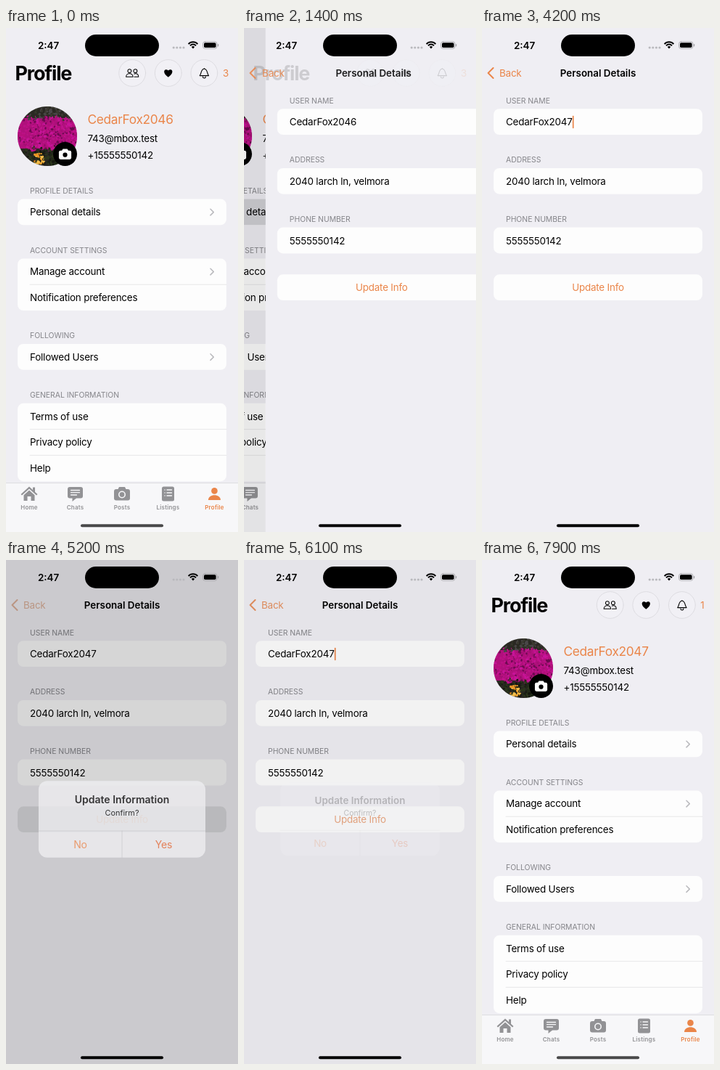
Animation of 320 by 694 pixels, one loop 8 s. Source, as an HTML page with a canvas:

```html
<!DOCTYPE html>
<html lang="en">
<head>
<meta charset="utf-8">
<title>Profile settings</title>
<style>
  html, body { margin: 0; width: 100%; height: 100%; overflow: hidden; background: #efeef3; }
  canvas { display: block; width: 320px; height: 694px; }
</style>
</head>
<body>
<canvas id="stage"></canvas>
<script>
const W = 320, H = 694, LOOP = 8000;
const BG = '#efeef3', CARD = '#fdfdfd', ORANGE = '#ea8549', GRAY = '#929295', PRESSED = '#d1d1d6';
const canvas = document.getElementById('stage');
const ctx = canvas.getContext('2d');
const dpr = window.devicePixelRatio || 1;
canvas.width = W * dpr;
canvas.height = H * dpr;

// Critically damped spring from 0 to 1
const spring = (t, start, speed) => {
  const u = Math.max(0, t - start) * speed / 1000;
  return 1 - (1 + u) * Math.exp(-u);
};
const ramp = (t, a, b) => Math.min(1, Math.max(0, (t - a) / (b - a)));

function layer(x, y, alpha, draw, scale = 1) {
  if (alpha <= 0) return;
  ctx.save();
  ctx.translate(x, y);
  ctx.scale(scale, scale);
  ctx.globalAlpha *= Math.min(1, alpha);
  draw();
  ctx.restore();
}

// y is the middle of the capital letters
function text(s, x, y, { size = 13.4, color = '#000', weight = 400, align = 'left', spacing } = {}) {
  ctx.font = `${weight} ${size}px Inter, sans-serif`;
  ctx.letterSpacing = (spacing ?? (weight === 400 && size > 11 ? -0.014 * size : 0)) + 'px';
  ctx.textAlign = align;
  ctx.fillStyle = color;
  ctx.fillText(s, x, y + size * 0.36);
  return ctx.measureText(s).width;
}

function box(x, y, w, h, r, color) {
  ctx.fillStyle = color;
  ctx.beginPath();
  ctx.roundRect(x, y, w, h, r);
  ctx.fill();
}

function disc(x, y, r, color) {
  ctx.fillStyle = color;
  ctx.beginPath();
  ctx.arc(x, y, r, 0, 7);
  ctx.fill();
}

function fill(d, color) {
  ctx.fillStyle = color;
  ctx.fill(new Path2D(d));
}

function line(d, color, width) {
  ctx.strokeStyle = color;
  ctx.lineWidth = width;
  ctx.lineCap = ctx.lineJoin = 'round';
  ctx.stroke(new Path2D(d));
}

const header = (s, y) => text(s, 33, y, { size: 10.4, color: '#85858a' });

function makeFlowers() {
  const c = document.createElement('canvas');
  c.width = c.height = 164;
  const g = c.getContext('2d');
  let seed = 11;
  const rnd = () => (seed = (seed * 16807) % 2147483647) / 2147483647;
  const pick = list => list[Math.floor(rnd() * list.length)];
  const dab = (x, y, r, color) => {
    g.fillStyle = color;
    g.beginPath();
    g.ellipse(x, y, r, r * 0.7, rnd() * 3, 0, 7);
    g.fill();
  };
  g.scale(2, 2);
  g.beginPath();
  g.arc(41, 41, 41, 0, 7);
  g.clip();
  g.fillStyle = '#2a2823';
  g.fillRect(0, 0, 82, 82);
  g.fillStyle = '#b0107c';
  g.fillRect(0, 16, 82, 42);
  for (let i = 0; i < 1100; i++) {
    const x = rnd() * 82, y = rnd() * 82;
    const tones = y < 13 + rnd() * 6 ? ['#3b3a30', '#4a4748', '#2a2c22']
      : y < 54 + rnd() * 10 ? ['#b8107e', '#c8149a', '#c2128c', '#a50e74', '#bb1286', '#6d0a50']
      : ['#1f2a16', '#2c371c', '#15180f', '#1b1c16'];
    dab(x, y, 1 + rnd() * 1.3, pick(tones));
  }
  for (let i = 0; i < 26; i++)
    dab(22 + rnd() * 15, 65 + rnd() * 14, 1 + rnd() * 1.5, pick(['#f0a02c', '#e98a1c', '#f4bd4a']));
  return c;
}
const flowers = makeFlowers();

function camera(color, hole, lens) {
  box(-11, -6, 22, 15.5, 3, color);
  fill('M-6-5L-4-9H4L6-5z', color);
  disc(0, 1.5, lens, hole);
}

const tabs = [
  ['Home', 32, () => {
    fill('M-11.5 1L0-9.5L11.5 1L10 2.6L0-6.4L-10 2.6z M5-8.5H8V-2L5-5z', GRAY);
    fill('M-7.5 2.2L0-4.6L7.5 2.2V10H2.5V4H-2.5V10H-7.5z', GRAY);
  }],
  ['Chats', 95.5, () => {
    box(-10.5, -9, 21, 15.5, 3, GRAY);
    fill('M-4 6V11L2 6z', GRAY);
    line('M-6-4.5H6M-6-1.3H6M-6 2H2', '#f7f7f9', 1.3);
  }],
  ['Posts', 160, () => {
    camera(GRAY, '#f7f7f9', 5);
    disc(0, 1.5, 3.4, GRAY);
  }],
  ['Listings', 223.5, () => {
    box(-8.5, -9.5, 17, 20, 2.5, GRAY);
    line('M-4.5-5h.1M-1.5-5H5M-4.5-1h.1M-1.5-1H5M-4.5 3h.1M-1.5 3H5', '#f7f7f9', 1.4);
  }],
  ['Profile', 287.5, () => {
    disc(0, -3.6, 4.3, ORANGE);
    fill('M-8.5 9C-8.5 0 8.5 0 8.5 9z', ORANGE);
  }],
];

const sections = [
  ['PROFILE DETAILS', 235.5, ['Personal details'], true],
  ['ACCOUNT SETTINGS', 317.5, ['Manage account', 'Notification preferences'], true],
  ['FOLLOWING', 435, ['Followed Users'], true],
  ['GENERAL INFORMATION', 516.8, ['Terms of use', 'Privacy policy', 'Help'], false],
];

function profilePage(name, pressed) {
  ctx.fillStyle = BG;
  ctx.fillRect(0, 0, W + 100, H);
  ctx.drawImage(flowers, 16, 108, 82, 82);
  disc(81.5, 173.5, 16.5, '#000');
  layer(81.5, 173.5, 1, () => camera('#fff', '#000', 4), 0.78);
  text(name, 112.5, 126, { size: 17.3, color: ORANGE, spacing: -0.33 });
  text('743@mbox.test', 112.5, 152);
  text('+15555550142', 112.5, 175);

  sections.forEach(([title, y, rows, chevron], i) => {
    header(title, y - 11.5);
    box(16, y, 288, rows.length * 35.8, 8, CARD);
    if (!i) layer(0, 0, pressed, () => box(16, y, 288, 35.8, 8, PRESSED));
    rows.forEach((row, j) => {
      const top = y + j * 35.8;
      text(row, 33, top + 18);
      if (j) line(`M33 ${top}H304`, '#e2e2e5', 0.8);
    });
    if (chevron) line(`M282 ${y + 13.8}l4.3 4.3l-4.3 4.3`, '#bababe', 1.5);
  });

  ctx.fillStyle = '#f7f7f9';
  ctx.fillRect(0, 626, W, H - 626);
  ctx.fillStyle = '#d4d4d7';
  ctx.fillRect(0, 626, W, 0.7);
  tabs.forEach(([label, x, icon], i) => {
    layer(x, 641, 1, icon);
    text(label, x, 660.3, { size: 8, weight: 600, align: 'center', spacing: 0.2, color: i === 4 ? ORANGE : GRAY });
  });
}

function profileBar(updated) {
  text('Profile', 12.5, 62, { size: 27, weight: 700, spacing: -1.2 });
  const icons = [
    () => {
      line('M-1.4-3a2.6 2.6 0 1 1-5.2 0a2.6 2.6 0 1 1 5.2 0M7-3a2.6 2.6 0 1 1-5.2 0a2.6 2.6 0 1 1 5.2 0', '#000', 1.1);
      line('M-9 5.5C-9-.8 1-.8 1 5.5zM3 5.5H9C9 1.2 6 .2 2.6 1.2', '#000', 1.1);
    },
    () => fill('M0 6C-10-1-5.5-8 0-3.8C5.5-8 10-1 0 6z', '#000'),
    () => line('M-6.5 3.8C-4 1.5-5-6 0-6S4 1.5 6.5 3.8zM-2 5.4a2 2 0 0 0 4 0M0-6v-.9', '#000', 1.2),
  ];
  icons.forEach((icon, i) => layer((updated ? 176.7 : 174.2) + i * 49.6, 62, 1, () => {
    disc(0, 0, 18.4, '#f1f0f5');
    line('M18.4 0a18.4 18.4 0 1 1-36.8 0a18.4 18.4 0 1 1 36.8 0', '#d8d7dc', 0.8);
    layer(0, 0, 1, icon, 0.95);
  }));
  text(updated ? '1' : '3', updated ? 304 : 303, 62, { color: ORANGE, align: 'center' });
}

function detailsPage(name, tint, cursor, pressed) {
  ctx.fillStyle = BG;
  ctx.fillRect(0, 0, W, H);
  const fields = [['USER NAME', name], ['ADDRESS', '2040 larch ln, velmora'], ['PHONE NUMBER', '5555550142']];
  fields.forEach(([label, value], i) => {
    const y = 111.2 + i * 81.7;
    header(label, y - 11.2);
    box(16, y, 288, 35.8, 8, CARD);
    const width = text(value, 33, y + 18.3);
    if (!i) layer(0, 0, cursor, () => box(33.3 + width, y + 9.5, 1.7, 17.5, 0.8, ORANGE));
  });
  box(16, 339.3, 288, 35.8, 8, CARD);
  layer(0, 0, pressed, () => box(16, 339.3, 288, 35.8, 8, PRESSED));
  text('Update Info', 160, 357.3, { color: tint, align: 'center' });
}

function detailsBar(p, tint) {
  text('Personal Details', 160 + 200 * (1 - p), 62, { weight: 600, align: 'center' });
  line('M15.5 55l-7 7l7 7', tint, 2);
  text('Back', 24 + 12 * (1 - p), 62, { color: tint });
}

function alertBox() {
  box(-110, -50.5, 220, 101, 11.5, 'rgba(241,240,243,.97)');
  text('Update Information', 0, -26, { weight: 600, align: 'center' });
  text('Confirm?', 0, -9, { size: 10.4, align: 'center' });
  line('M-110 15.3H110M0 15.3V50.5', '#c2c1c6', 0.7);
  text('No', -55, 33.5, { color: ORANGE, align: 'center' });
  text('Yes', 55, 33.5, { color: '#e2632f', align: 'center' });
}

function statusBar(p) {
  text('2:47', 58.5, 23.7, { weight: 600, align: 'center' });
  box(109, 9, 102, 30, 15, '#000');
  for (let i = 0; i < 4; i++) disc(231.2 + i * 4.6, 27, 1.6, '#b9b9bd');
  const arc = r => `M${258 - r * 0.74} ${28 - r * 0.68}A${r} ${r} 0 0 1 ${258 + r * 0.74} ${28 - r * 0.68}`;
  ctx.lineCap = 'butt';
  ctx.strokeStyle = '#000';
  ctx.lineWidth = 2;
  ctx.stroke(new Path2D(arc(8.6) + arc(5.4)));
  fill('M258 28.5L255.8 26Q258 24.2 260.2 26z', '#000');
  line('M274.5 18.8h13.5a3 3 0 0 1 3 3v3.6a3 3 0 0 1-3 3h-13.5a3 3 0 0 1-3-3v-3.6a3 3 0 0 1 3-3z', '#a0a0a4', 0.8);
  box(273, 20.2, 16.6, 6.8, 1.8, '#000');
  box(292, 22, 1.2, 3.4, 0.6, '#a0a0a4');
  // The home indicator is lighter above the tab bar
  box(103, 683.3, 114, 4, 2, `rgba(0,0,0,${0.7 + 0.3 * p})`);
}

function cursorAlpha(t) {
  if (t < 2750 || (t > 5000 && t < 5900)) return 0;
  if (t > 5900) return 1;
  return 1 - ramp(t, 3700, 3850) + ramp(t, 4120, 4200) - ramp(t, 4700, 4900);
}

function mixTint(k) {
  const to = [208, 208, 212];
  return `rgb(${[234, 133, 73].map((c, i) => Math.round(c + (to[i] - c) * k))})`;
}

function render(t) {
  const popping = t >= 6320;
  const p = popping ? 1 - spring(t, 6320, 13) : spring(t, 1095, 13);
  const closing = t >= 5880;
  const alert = closing ? 1 - spring(t, 5880, 13) : spring(t, 5045, 18);
  const name = 'CedarFox204' + (t < 3400 ? '6' : t < 3600 ? '' : '7');
  const tint = mixTint(alert * 0.75);

  ctx.setTransform(dpr, 0, 0, dpr, 0, 0);
  ctx.fillStyle = BG;
  ctx.fillRect(0, 0, W, H);

  layer(-96 * p, 0, 1, () => profilePage(name, popping ? p : t >= 980 ? 1 : 0));
  ctx.fillStyle = `rgba(0,0,0,${0.09 * p})`;
  ctx.fillRect(0, 0, W * (1 - p), H);
  if (p > 0) {
    const pressed = t >= 5045 ? 1 - ramp(t, 5130, 5450) : 0;
    layer(W * (1 - p), 0, 1, () => detailsPage(name, tint, cursorAlpha(t), pressed));
  }
  layer(0, 0, 1.5 * (1 - p), () => profileBar(t >= 4000));
  layer(0, 0, ramp(p, 0.2, 1), () => detailsBar(p, tint));

  ctx.fillStyle = `rgba(0,0,0,${0.2 * alert})`;
  ctx.fillRect(0, 0, W, H);
  layer(160, 357, alert, alertBox, closing ? 1 : 1.2 - 0.2 * alert);
  statusBar(p);
}

function frame() {
  render(performance.now() % LOOP);
  requestAnimationFrame(frame);
}
frame();
</script>
</body>
</html>
```
